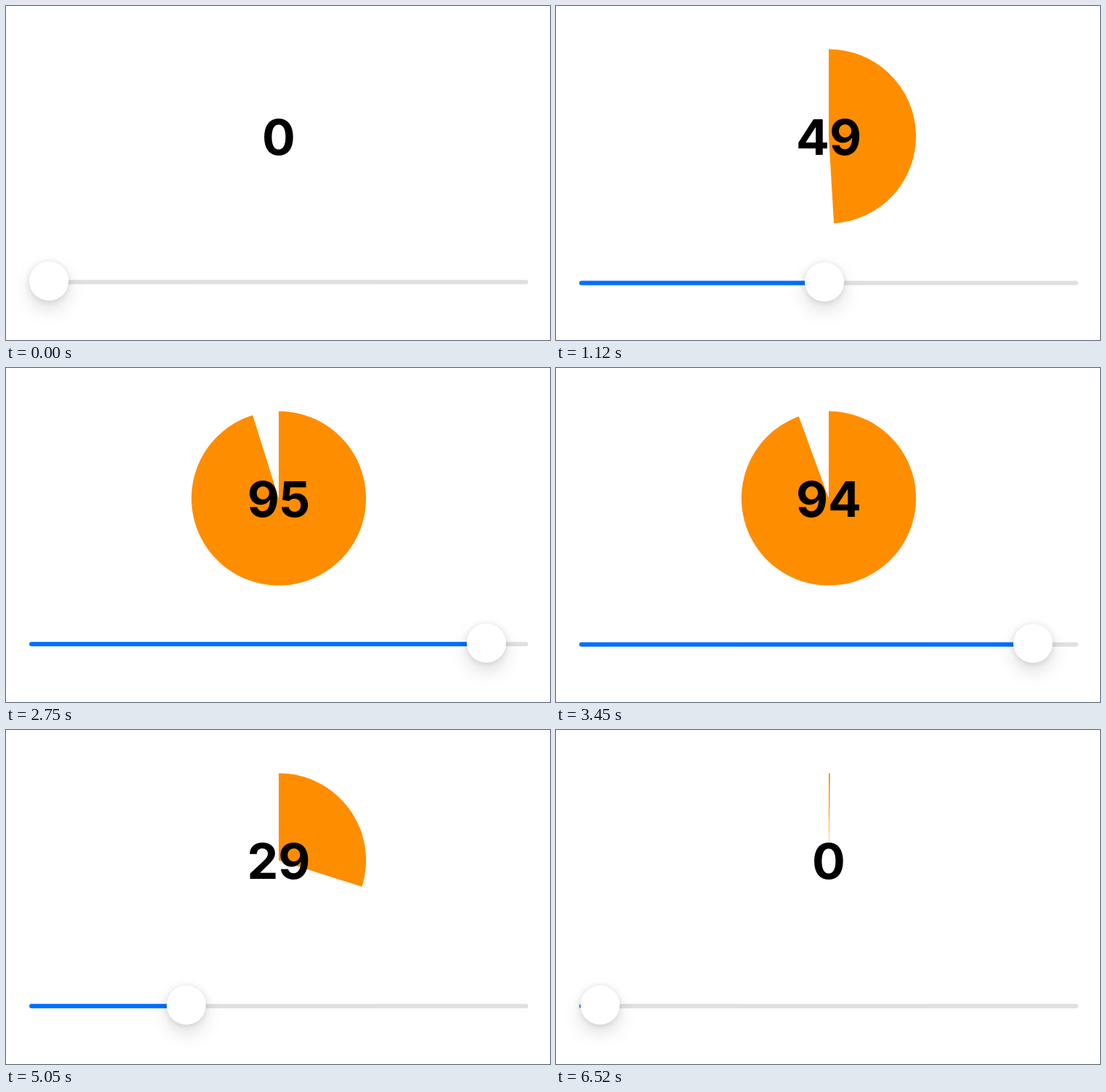
Recreate the animation shown at these times as an HTML page. Size 748 by 460 pixels, loop 6550 ms.

```html
<!DOCTYPE html>
<html lang="en">
<head>
<meta charset="utf-8">
<title>Pie slider</title>
<style>
html, body { margin: 0; width: 100%; height: 100%; overflow: hidden; background: #fff; }
svg { position: absolute; left: 0; top: 0; }
text { font: 700 68px Inter, sans-serif; text-anchor: middle; }
#thumb {
  position: absolute; left: 32px; top: 0; width: 54px; height: 54px;
  border-radius: 50%; background: #fff;
  box-shadow: 0 1px 8px rgba(0, 0, 0, .12), 0 12px 26px rgba(0, 0, 0, .13);
}
</style>
</head>
<body>
<svg width="748" height="460">
  <path id="pie" fill="#ff8d00"/>
  <text id="label" x="375" y="204.5"></text>
  <g id="track">
    <rect x="32" y="-3" width="686" height="6" rx="3" fill="#e0e0e0"/>
    <rect id="fill" x="32" y="-3" height="6" rx="3" fill="#006fff"/>
  </g>
</svg>
<div id="thumb"></div>
<script>
const LOOP = 6550, STEP = 100 / 3, TRAVEL = 632, CX = 375, CY = 179.5, R = 120;
const $ = id => document.getElementById(id);
const pie = $('pie'), label = $('label'), track = $('track'), fill = $('fill'), thumb = $('thumb');

const progress = (t, start, length) => Math.min(1, Math.max(0, (t - start) / length));
const remaining = p => (1 - p) ** 1.62;

function sector(v) {
  if (v <= 0) return '';
  const a = Math.min(v, .9999) * 2 * Math.PI;
  const x = CX + R * Math.sin(a), y = CY - R * Math.cos(a);
  return `M${CX} ${CY}V${CY - R}A${R} ${R} 0 ${v > .5 ? 1 : 0} 1 ${x} ${y}Z`;
}

function draw(now) {
  const ms = now % LOOP;
  const t = ms < 16 ? 0 : 20 + STEP * Math.floor((ms - 16) / STEP);

  // One drag up and one drag back, each slowing towards its end
  const up = progress(t, 20, 3230), down = progress(t, 3340, 3260);
  const v = down > 0 ? remaining(down) : 1 - remaining(up);

  // The slider sinks slightly during the first half of each drag
  const y = 378.8 + 1.5 * Math.max(0, Math.sin(2 * Math.PI * (down || up)));

  pie.setAttribute('d', sector(v));
  label.textContent = Math.floor(v * 100);
  track.setAttribute('transform', `translate(0 ${y + 1.5})`);
  fill.setAttribute('width', v > 0 ? TRAVEL * v + 27 : 0);
  thumb.style.transform = `translate(${TRAVEL * v}px, ${y - 27}px)`;
  requestAnimationFrame(draw);
}
draw(0);
</script>
</body>
</html>
```
